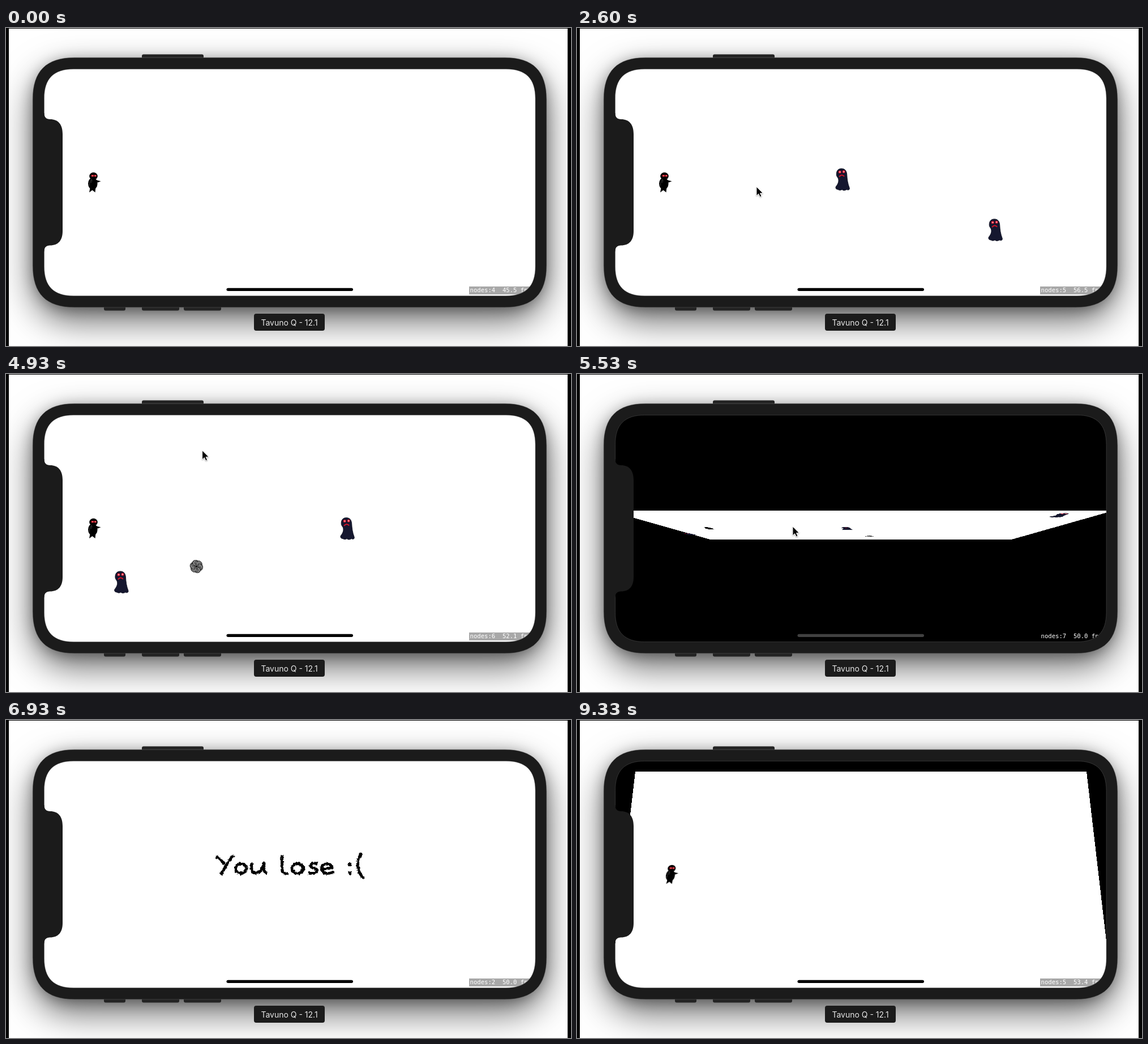
Animation, 998 px wide and 561 px high, one loop 9400 ms. Source, as an HTML page:

```html
<!DOCTYPE html>
<html lang="en">
<head>
<meta charset="utf-8">
<title>Ninja game in a simulator</title>
<style>
html, body { margin: 0; width: 100%; height: 100%; overflow: hidden; background: #fff; }
body { position: relative; }
body * { box-sizing: border-box; }
.abs, #phone, #screen, #scene, #label { position: absolute; }
.edge { background: #000; }
#phone {
  left: 48px; top: 53px; width: 906px; height: 439px; border-radius: 66px; background: #1b1b1b;
  box-shadow: 0 24px 62px rgba(0,0,0,.6), 0 4px 24px rgba(0,0,0,.32);
}
#screen {
  left: 67px; top: 72px; width: 869px; height: 401px;
  background: #000; overflow: hidden; perspective: 607px;
}
#scene { inset: 0; background: #fff; }
#stats {
  left: 751px; top: 384px; width: 130px; height: 14px; padding-left: 1.5px;
  background: rgba(0,0,0,.34); color: #fff; white-space: pre;
  font: 10.6px/13px "DejaVu Sans Mono", monospace;
}
#label {
  left: 438px; top: 504px; width: 125px; height: 30px; border-radius: 4px; background: #1b1b1b;
  color: #e8e8e8; text-align: center; font: 14px/32px Inter, "Open Sans", sans-serif;
}
svg { position: absolute; left: 0; top: 0; overflow: visible; }
</style>
</head>
<body>
<div id="phone"></div>

<div id="screen">
  <div id="scene">
    <svg width="869" height="401" viewBox="67 72 869 401">
      <defs>
        <g id="monster">
          <path fill="#15172f" stroke="#0b0d1c" stroke-width=".8" d="M-11-9C-11-16-7-19-2-19C4-19 7-15 7.500-9C8 0 9 7 12 15C13 18 10 20 7 18C4 20 1 20-1 18C-4 20-7 19-8 18C-11 18-13 16-12 13C-8 8-6 3-8-2C-10-5-11-6-11-9Z"/>
          <g fill="#e3182d"><circle cx="-5" cy="-13" r="2.500"/><circle cx="2" cy="-13.400" r="2.500"/></g>
          <g fill="#ffd9dc"><circle cx="-4.800" cy="-13" r="1.100"/><circle cx="2" cy="-13.400" r="1.100"/></g>
          <path d="M-6-4.600Q-2-10 3-5.200" fill="none" stroke="#d3142a" stroke-width="2"/>
        </g>
        <path id="blade" d="M0-2C-2-7 1-11 6-9.500C9-8 10.500-5 9.500-2.500C8-6 5-6.500 3-3Z"/>
        <path id="vein" d="M1-3.500C1-7 3.500-9 7-7"/>
        <g id="star">
          <g id="blades" fill="#666" stroke="#222" stroke-width=".9"></g>
          <g id="veins" fill="none" stroke="#c4c4c4" stroke-width=".6"></g>
          <circle r="1.800" fill="#111"/>
        </g>
        <filter id="chalk" x="-5%" y="-20%" width="110%" height="140%">
          <feTurbulence type="fractalNoise" baseFrequency=".3" numOctaves="2" seed="4"/>
          <feDisplacementMap in="SourceGraphic" scale="4.500" xChannelSelector="R" yChannelSelector="G"/>
        </filter>
      </defs>

      <g id="game">
        <g id="ninja">
          <path d="M149 280L147 290L152.500 286L157.500 290L158.500 280Z"/>
          <ellipse cx="153.300" cy="274.500" rx="8.300" ry="10.500"/>
          <ellipse cx="154.500" cy="261.300" rx="7.300" ry="6.500"/>
          <path d="M158 267.500L163 269.300L167.500 270.200L163.500 272L158 273.500Z"/>
          <path d="M151 267Q147 271 147.500 278M151.500 267.500Q152.500 270 150 273" fill="none" stroke="#484848" stroke-width=".8"/>
          <path d="M150 260.600H160" stroke="#7a0d16" stroke-width="3.200"/>
          <g fill="#ff3340"><circle cx="153" cy="260.700" r="1.500"/><circle cx="157.800" cy="260.700" r="1.500"/></g>
          <g fill="#ffd0d0"><circle cx="153" cy="260.600" r=".6"/><circle cx="157.800" cy="260.600" r=".6"/></g>
        </g>
        <g id="actors"></g>
      </g>

      <g id="lose">
        <text x="501" y="272" text-anchor="middle" font-family="Lato, sans-serif" font-size="43" fill="#000" fill-opacity="0">You lose :(</text>
        <g fill="none" stroke="#000" stroke-width="5" stroke-linejoin="round" filter="url(#chalk)">
          <path d="M371 241Q380 246 386 255M402 239Q391 250 380 273"/>
          <ellipse cx="415" cy="262" rx="9.500" ry="8.500"/>
          <path d="M434 252C433 262 434 270 441 270C448 270 453 264 455 252C454 262 456 269 461 271"/>
          <path d="M488 238C487 250 488 262 488 267Q490 271 498 271"/>
          <ellipse cx="515" cy="262" rx="10" ry="8.500"/>
          <path d="M551 254C543 251 535 255 539 259C543 262 552 262 549 267C546 271 540 271 534 270"/>
          <path d="M558 263L576 261C575 251 559 251 557.500 262C557 272 571 272 579 268"/>
          <path d="M604.500 255H610M604.500 270H610" stroke-width="6"/>
          <path d="M628 235C619 247 618 268 633 280"/>
        </g>
      </g>
    </svg>
  </div>
  <div id="stats" class="abs"></div>
</div>

<svg width="998" height="561">
  <rect id="home" x="389.500" y="458.700" width="223.500" height="5.300" rx="2.650"/>
  <g fill="#232323">
    <path d="M240 52.500V49.500Q240 46.500 243 46.500H346Q349 46.500 349 49.500V52.500Z"/>
    <path d="M173 492V495.500Q173 498.500 176 498.500H208Q211 498.500 211 495.500V492Z"/>
    <path d="M240 492V495.500Q240 498.500 243 498.500H303Q306 498.500 306 495.500V492Z"/>
    <path d="M314 492V495.500Q314 498.500 317 498.500H377Q380 498.500 380 495.500V492Z"/>
  </g>
  <path id="bezel" fill="#1b1b1b" fill-rule="evenodd" stroke="#666" stroke-opacity=".5" stroke-width=".8"/>
  <path fill="#1b1b1b" d="M66 150H67.500Q67.500 161 78 161C92 161 100 170 100 187V358C100 375 92 383.500 78 383.500Q67.500 383.500 67.500 394H66Z"/>
</svg>
<div id="label">Tavuno Q - 12.1</div>
<svg width="998" height="561">
  <g id="cursor" style="filter:drop-shadow(0 1px 1px rgba(0,0,0,.35))">
    <path d="M0 0V16L3.700 12.600L6.300 18L9 17L6.500 11.500H11.500Z" fill="#000" stroke="#fff" stroke-width="1"/>
  </g>
</svg>
<div class="abs edge" style="left:0;top:0;width:5px;height:100%"></div>
<div class="abs edge" style="right:0;top:0;width:6px;height:100%"></div>
<div class="abs edge" style="left:0;top:0;width:100%;height:1px"></div>

<script>
const $ = id => document.getElementById(id);
const LOOP = 9400, STEP = 200 / 3;
const LOST = 5308, RESTART = 8860, FLIP = 500;

// born, gone (ms), y, speed (px/ms); all walk left from just off screen
const monsters = [
  { born: 0, gone: 1990, y: 447, v: .24 },
  { born: 949, gone: 3080, y: 267, v: .29 },
  { born: 1984, gone: 3940, y: 356, v: .339 },
  { born: 2970, gone: LOOP, y: 367, v: .379 },
  { born: 3970, gone: LOOP, y: 272.5, v: .358 },
  { born: 4960, gone: LOOP, y: 115, v: .229 }
];
// fired, gone (ms), point aimed at
const shots = [
  { born: 1440, gone: 1990, aim: [396, 433] },
  { born: 2790, gone: 3080, aim: [317, 280] },
  { born: 3702, gone: 3940, aim: [236, 308] },
  { born: 4569, gone: LOOP, aim: [524, 409] }
];
const SHOT_SPEED = .534, HAND = [154, 272];

// time, x, y
const cursorKeys = [
  [650, 438, 504], [1150, 396, 433], [1500, 396, 433], [2400, 317, 280], [2850, 317, 280],
  [3550, 297, 334], [4000, 297, 334], [4560, 308, 329], [4980, 348, 128], [5450, 381, 269],
  [6480, 381, 269], [6870, 447, 486]
];
const CURSOR_OFF = 6920;
const rates = [[0, "45.5"], [1000, "53.0"], [2000, "56.5"], [3000, "50.3"], [4000, "52.1"], [5060, "50.0"], [8925, "53.4"]];

// Rectangle with smooth corners that ease in over c pixels
function squircle(l, t, r, b, c) {
  const k = c * .32;
  return `M${l} ${t + c}C${l} ${t + k} ${l + k} ${t} ${l + c} ${t}H${r - c}` +
    `C${r - k} ${t} ${r} ${t + k} ${r} ${t + c}V${b - c}` +
    `C${r} ${b - k} ${r - k} ${b} ${r - c} ${b}H${l + c}C${l + k} ${b} ${l} ${b - k} ${l} ${b - c}Z`;
}
$("bezel").setAttribute("d", squircle(47.2, 52.2, 954.8, 492.8, 74) + squircle(67.5, 72.5, 935, 472.5, 52));

function use(parent, ref) {
  const el = document.createElementNS("http://www.w3.org/2000/svg", "use");
  el.setAttribute("href", "#" + ref);
  parent.append(el);
  return el;
}
for (let i = 0; i < 6; i++) {
  for (const part of ["blade", "vein"]) {
    use($(part + "s"), part).setAttribute("transform", `rotate(${i * 60})`);
  }
}
monsters.forEach(m => m.el = use($("actors"), "monster"));
shots.forEach(s => s.el = use($("actors"), "star"));

const show = (el, on) => el.style.display = on ? "" : "none";
const move = (el, x, y) => el.setAttribute("transform", `translate(${x.toFixed(2)} ${y.toFixed(2)})`);

function drawActors(t, playing) {
  let alive = 0;
  for (const a of [...monsters, ...shots]) {
    const on = playing && t >= a.born && t < a.gone;
    show(a.el, on);
    if (!on) continue;
    alive++;
    const age = t - a.born;
    if (a.aim) {
      const angle = Math.atan2(a.aim[1] - HAND[1], a.aim[0] - HAND[0]);
      const d = age * SHOT_SPEED;
      move(a.el, HAND[0] + d * Math.cos(angle), HAND[1] + d * Math.sin(angle));
    } else {
      move(a.el, 948 - age * a.v, a.y);
    }
  }
  return alive;
}

function drawCursor(t) {
  const on = t >= cursorKeys[0][0] && t < CURSOR_OFF;
  show($("cursor"), on);
  if (!on) return;
  const i = cursorKeys.findIndex(k => k[0] > t);
  if (i < 0) {
    const last = cursorKeys[cursorKeys.length - 1];
    return move($("cursor"), last[1], last[2]);
  }
  const a = cursorKeys[i - 1], b = cursorKeys[i];
  const p = (t - a[0]) / (b[0] - a[0]), e = p * p * (3 - 2 * p);
  move($("cursor"), a[1] + (b[1] - a[1]) * e, a[2] + (b[2] - a[2]) * e);
}

// Tilt in degrees: top edge comes forward, then the next scene swings in from behind.
function tiltAt(t) {
  const p = (t - (t < 7000 ? LOST : RESTART)) / FLIP;
  if (p <= 0 || p >= 1) return 0;
  return p < .5 ? -180 * p : 180 * (1 - p);
}

function drawFlip(t) {
  const tilt = tiltAt(t), rad = tilt * Math.PI / 180, back = Math.abs(tilt) / 90 * 200;
  $("scene").style.transform = tilt ? `translateZ(${-back}px) rotateX(${tilt}deg)` : "none";
  const depth = 607 + back - 200 * Math.sin(rad);
  const bottom = 200 + 200 * Math.cos(rad) * 607 / depth;
  $("home").style.fill = bottom < 389 ? "#414141" : "#000";
}

function draw(t) {
  const lost = t >= LOST + FLIP / 2 && t < RESTART + FLIP / 2;
  const again = t >= RESTART + FLIP / 2;
  show($("game"), !lost);
  show($("lose"), lost);
  const alive = drawActors(Math.min(t, LOST), !lost && !again);
  const nodes = lost ? 2 : again ? 5 : 3 + alive;
  const rate = rates.filter(r => r[0] <= t).pop()[1];
  $("stats").textContent = `nodes:${nodes}  ${rate} fps`;
  drawFlip(t);
  drawCursor(t);
}

function tick() {
  const now = performance.now() % LOOP;
  let t = Math.floor((now + 4) / STEP) * STEP;
  if (now >= 6930 && now < 8930) t = 6933;
  draw(t % LOOP);
  requestAnimationFrame(tick);
}
tick();
</script>
</body>
</html>
```
